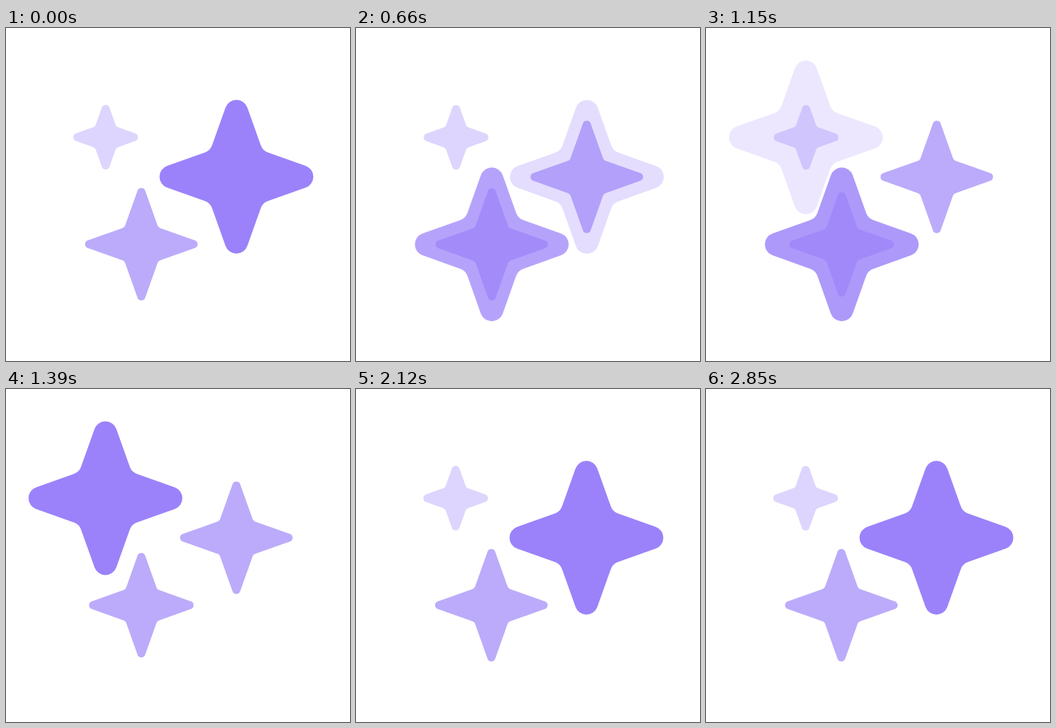
Recreate the animation shown at these times as an HTML page. Size 474 by 459 pixels, loop 3510 ms.

```html
<!DOCTYPE html>
<html>
<head>
<meta charset="utf-8">
<style>
  html, body { margin: 0; width: 100%; height: 100%; overflow: hidden; background: #fff; }
  svg { display: block; width: 100vw; height: 100vh; }
</style>
</head>
<body>
<svg id="stage" viewBox="0 0 474 459"></svg>
<script>
const LOOP = 3510, STEP = 80, FADE = 340, LEAD = 42;
const DARK = '#9b82fa', MID = '#bbabfa', LIGHT = '#ddd5fd';
const SLOPE = 0.356, TILT = Math.atan(SLOPE);

// Four-pointed star: reach of the points, radius of the rounded corners
function star(x, y, reach, r, color) {
  const tipX = r * Math.cos(TILT);
  const tipY = reach - r + r * Math.sin(TILT);
  const corner = (tipX + SLOPE * tipY) / (1 + SLOPE);
  const trim = r * Math.tan(Math.PI / 4 - TILT);
  const near = corner - trim * Math.sin(TILT);
  const far = corner + trim * Math.cos(TILT);
  let d = '';
  for (let i = 0; i < 4; i++) {
    const at = (px, py) => {
      for (let k = 0; k < i; k++) [px, py] = [-py, px];
      return `${(x + px).toFixed(2)} ${(y + py).toFixed(2)}`;
    };
    d += `${i ? 'L' : 'M'}${at(-near, -far)}L${at(-tipX, -tipY)}` +
      `A${r} ${r} 0 0 1 ${at(tipX, -tipY)}L${at(near, -far)}` +
      `A${r} ${r} 0 0 0 ${at(far, -near)}`;
  }
  return `<path d="${d}Z" fill="${color}"/>`;
}

const big = (x, y) => star(x, y, 106, 16, DARK);
const medium = (x, y, reach = 77.5) => star(x, y, reach, 5.6, MID);
const small = (x, y) => star(x, y, 44.5, 5.6, LIGHT);

const first = small(137.3, 150.5) + big(317.5, 205) + medium(186.5, 298);
const scenes = [
  first,
  small(137.3, 150.5) + medium(317.4, 205) + big(186.5, 298),
  big(137, 150.5) + medium(317.4, 205) + medium(186.5, 298, 72),
  first,
  first
];
const starts = [500, 1070, 1720, 2450];

// Opaque layers, so that fading one in dissolves the layer below
stage.innerHTML = scenes.map(s =>
  `<g><rect x="-9" y="-9" width="492" height="477" fill="#fff"/>${s}</g>`).join('');
const layers = [...stage.children];

const ease = x => x < 0.5 ? 4 * x ** 3 : 1 - 4 * (1 - x) ** 3;

function progress(t, start) {
  if (t < start) return 0;
  const held = Math.floor((t - start) / STEP) * STEP;
  return ease(Math.min(1, (held + LEAD) / FADE));
}

let origin;
function draw(now) {
  origin ??= now;
  const t = (now - origin) % LOOP;
  let moving = false;
  starts.forEach((start, i) => {
    const p = progress(t, start);
    layers[i + 1].setAttribute('opacity', p);
    if (p > 0 && p < 1) moving = true;
  });
  // The picture sits slightly off its resting place while dissolving
  const shift = moving ? 'translate(0.6 0.3)' : '';
  layers.forEach(g => g.setAttribute('transform', shift));
  requestAnimationFrame(draw);
}
requestAnimationFrame(draw);
</script>
</body>
</html>
```
